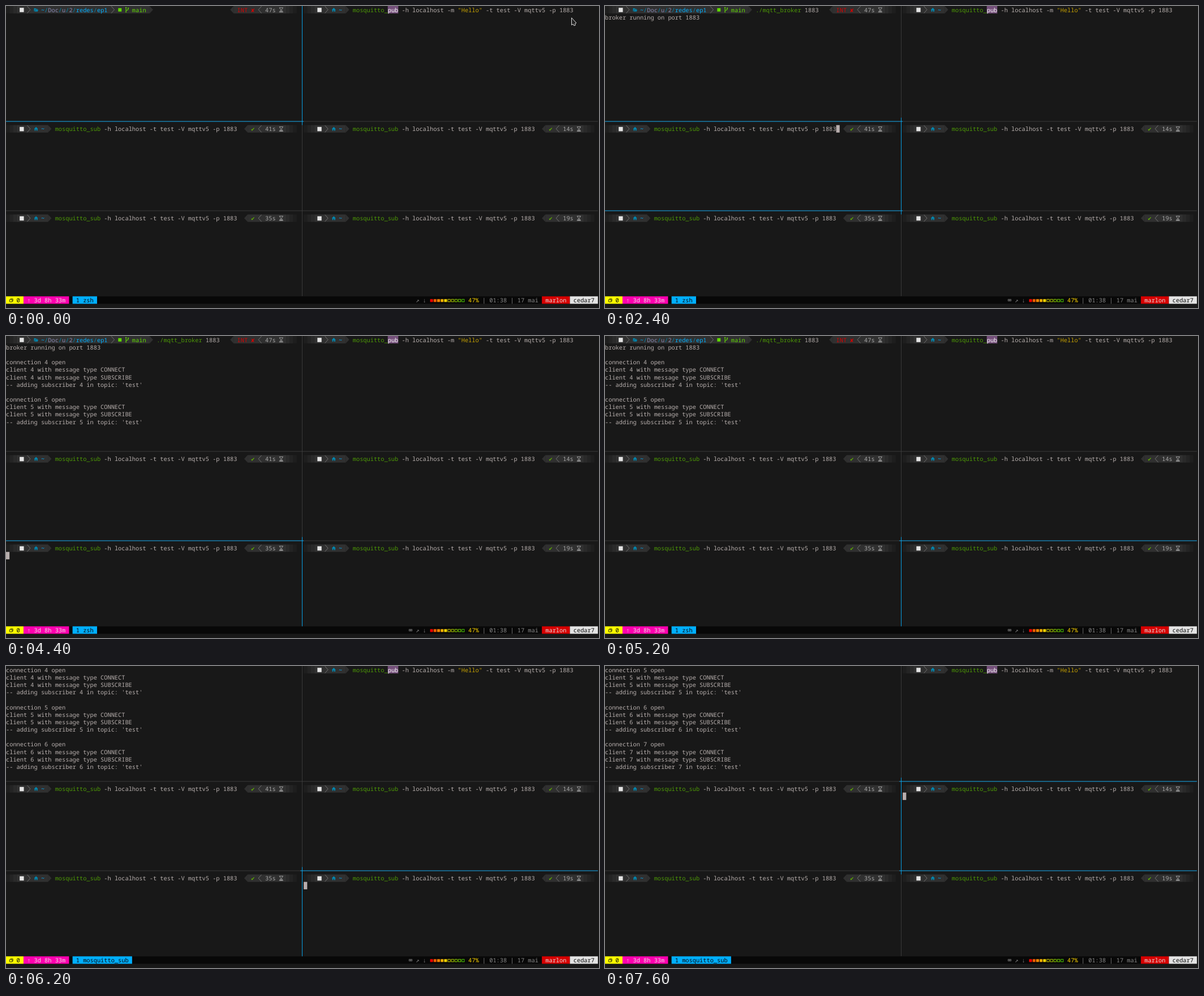
These frames come from a looping animation (1048 by 534 pixels, 8 s). An HTML page:

```html
<!DOCTYPE html>
<html lang="en">
<head>
<meta charset="utf-8">
<title>Broker terminal session</title>
<style>
html, body { margin: 0; width: 100%; height: 100%; overflow: hidden; background: #181818; }
svg { display: block; width: 1048px; height: 534px; }
text {
  font: 10.32px "Noto Sans Mono", "DejaVu Sans Mono", monospace;
  white-space: pre;
  text-rendering: geometricPrecision;
}
</style>
</head>
<body>
<svg id="stage" viewBox="0 0 1048 534">
  <g id="fixed"></g>
  <g id="live"></g>
</svg>
<script>
const LOOP = 8000;
const W = 6.19, H = 13.163;      // terminal cell
const SPLIT = 84;                // column of the vertical divider
const COLS = 169, STATUS_ROW = 39, TOP_ROWS = 15;

const C = {
  text: '#b8b0ae', cursor: '#b8aeae', command: '#4e9a06', quoted: '#c4a000',
  pill: '#303030', thin: '#808080', dir: '#0087af', anchor: '#00afff', short: '#8787af',
  git: '#5fd700', ok: '#5faf00', error: '#d70000', took: '#a8a8a8', mark: '#e4e4e4',
  border: '#404040', active: '#00afff', bar: '#080808', muted: '#8a8a8a',
};

const n = v => +v.toFixed(2);
const escape = s => s.replace(/&/g, '&amp;').replace(/</g, '&lt;');

const rect = (x, y, w, h, fill, extra = '') =>
  `<rect x="${n(x)}" y="${n(y)}" width="${n(w)}" height="${n(h)}" fill="${fill}" ${extra}/>`;

const cells = (col, row, count, fill, extra) =>
  rect(col * W, row * H, count * W, H, fill, extra);

const text = (col, row, str, fill = C.text, bold = false) =>
  `<text x="${n(col * W)}" y="${n(row * H + 10.75)}" fill="${fill}"${bold ? ' font-weight="700"' : ''}>${escape(str)}</text>`;

// A path in coordinates local to one cell
const glyph = (col, row, d, fill, stroke = 'none', width = .8) =>
  `<path transform="translate(${n(col * W)} ${n(row * H)})" d="${d}" fill="${fill}" stroke="${stroke}" stroke-width="${width}"/>`;

// Consecutive [text, colour, bold] pieces
function run(col, row, pieces) {
  let out = '';
  for (const [str, fill, bold] of pieces) {
    out += text(col, row, str, fill, bold);
    col += str.length;
  }
  return out;
}

const ICON = {
  home: 'M0 6.8L3.6 3.2L7.2 6.8H6.2V10H4.3V7.6H2.9V10H1V6.8Z',
  folder: 'M0 9.6V4H2.6L3.4 5H6V6H2L.8 9.6ZM1.2 9.8L2.4 6.6H7.6L6.4 9.8Z',
  branch: 'M1.6 3V10.6M5.6 4V5.4Q5.6 7 1.6 8M.5 2.6H2.7M.5 10.8H2.7M4.5 3.6H6.7',
  hourglass: 'M0 3H7M0 10.8H7M1 3V4.4L3.2 6.9L1 9.4V10.8M6 3V4.4L3.8 6.9L6 9.4V10.8M2 10L3.5 8.6L5 10Z',
  keyboard: 'M.4 5.3H5.9V8.3H.4ZM1.3 6.4H5M1.8 7.4H4.5',
  stack: 'M1.8 5V4.5H6V8.7H5M.4 5.6H4.6V9.8H.4Z',
};

const thinRight = (col, row) => glyph(col, row, `M.3 .4L5.8 ${H / 2}L.3 ${H - .4}`, 'none', C.thin);
const thinLeft = (col, row) => glyph(col, row, `M5.9 .4L.4 ${H / 2}L5.9 ${H - .4}`, 'none', C.thin);

const fade = (col, row, order) =>
  order.map((a, i) => cells(col + i, row, 1, C.pill, `opacity="${a}"`)).join('');

function promptLeft(col, row, width) {
  return fade(col, row, [.25, .5, .75]) +
    cells(col + 3, row, width - 3, C.pill) +
    glyph(col + width, row, `M0 0L${W} ${H / 2}L0 ${H}Z`, C.pill) +
    rect((col + 4) * W - .6, row * H + 3.2, 7.4, 7.6, C.mark) +
    thinRight(col + 6, row);
}

const homePrompt = (col, row) =>
  promptLeft(col, row, 12) +
  glyph(col + 8, row, ICON.home, C.dir) +
  text(col + 10, row, '~', C.anchor, true);

function promptRight(col, row, start, status, took) {
  return glyph(col + start, row, `M${W} 0L0 ${H / 2}L${W} ${H}Z`, C.pill) +
    cells(col + start + 1, row, 79 - start, C.pill) +
    fade(col + 80, row, [.75, .5, .25]) +
    status + thinLeft(col + 72, row) +
    text(col + 74, row, took, C.took) +
    glyph(col + 78, row, ICON.hourglass, 'none', C.took, .9);
}

const subscriber = (col, row, took) =>
  homePrompt(col, row) +
  run(col + 14, row, [['mosquitto_sub', C.command], [' -h localhost -t test -V mqttv5 -p 1883', C.text]]) +
  promptRight(col, row, 68, text(col + 70, row, '✔', C.ok), took);

function publisher() {
  const col = SPLIT + 1;
  return homePrompt(col, 0) + cells(col + 24, 0, 3, '#75507b') +
    run(col + 14, 0, [
      ['mosquitto_', C.command], ['pub', '#ffffff', true], [' -h localhost -m ', C.text],
      ['"Hello"', C.quoted], [' -t test -V mqttv5 -p 1883', C.text],
    ]);
}

function brokerPrompt(row) {
  return promptLeft(0, row, 41) +
    glyph(8, row, ICON.folder, C.dir) +
    run(10, row, [
      ['~', C.anchor, true], ['/', C.dir], ['Doc', C.short], ['/', C.dir], ['u', C.short], ['/', C.dir],
      ['2', C.short], ['/', C.dir], ['redes', C.anchor, true], ['/', C.dir], ['ep1', C.anchor, true],
    ]) +
    thinRight(30, row) +
    rect(32 * W + .2, row * H + 3.8, 6, 6, C.git) +
    glyph(34, row, ICON.branch, 'none', C.git, 1.1) +
    text(36, row, 'main', C.git) +
    promptRight(0, row, 64, text(66, row, 'INT', C.error) + text(70, row, '✘', C.error), '47s');
}

const hLine = (row, from, to, fill) => rect(from * W, row * H + 6.19, (to - from) * W, .85, fill);
const vLine = (from, to, fill) => rect(SPLIT * W + 3.1, from * H, .85, (to - from) * H, fill);

// Pane edges: rows of the dividers above and below (null at the screen edge)
const PANES = [
  { right: false, above: null, below: 15 },
  { right: false, above: 15, below: 27 },
  { right: false, above: 27, below: null },
  { right: true, above: 27, below: null },
  { right: true, above: 15, below: 27 },
];

function activeBorder({ right, above, below }) {
  const from = right ? SPLIT : 0, to = right ? COLS : SPLIT + 1;
  return [above, below].filter(r => r !== null).map(r => hLine(r, from, to, C.active)).join('') +
    vLine(above ?? 0, below === null ? STATUS_ROW : below + 1, C.active);
}

function battery() {
  const heat = ['#ff0000', '#ff5f00', '#ff8700', '#ffaf00', '#ffd700',
    '#ffff00', '#d7ff00', '#afff00', '#87ff00', '#5fff00'];
  const y = STATUS_ROW * H + 5;
  return heat.map((c, i) => {
    const x = (121 + i) * W + .6;
    return i < 5 ? rect(x, y, 5, 5, c)
      : rect(x + .4, y + .4, 4.2, 4.2, 'none', `stroke="${c}" stroke-width=".8"`);
  }).join('');
}

function statusBar() {
  const r = STATUS_ROW;
  return cells(0, r, COLS, C.bar) +
    cells(0, r, 5, '#ffff00') + glyph(1, r, ICON.stack, 'none', C.bar) + text(3, r, '0', C.bar, true) +
    cells(5, r, 13, '#ff00af') + text(6, r, '↑', C.mark) + text(8, r, '3d 8h 33m', C.mark) +
    text(117, r, '↗', C.muted) + text(119, r, '↓', C.muted) +
    battery() + text(132, r, '47%', '#ffd700') +
    text(136, r, '| 01:38 | 17 mai', C.muted) +
    cells(153, r, 8, '#d70000') + text(154, r, 'marlon', C.mark) +
    cells(161, r, 8, C.mark) + text(162, r, 'cedar7', C.bar, true);
}

const clientLog = id => [
  '', `connection ${id} open`,
  `client ${id} with message type CONNECT`,
  `client ${id} with message type SUBSCRIBE`,
  `-- adding subscriber ${id} in topic: 'test'`,
];

function brokerPane({ typed, started, clients }) {
  const lines = ['', started ? 'broker running on port 1883' : ''];
  for (let i = 0; i < clients; i++) lines.push(...clientLog(4 + i));
  const scroll = Math.max(0, lines.length + 1 - TOP_ROWS);
  let out = lines.slice(scroll).map((s, i) => s && text(0, i, s)).join('');
  if (!scroll) {
    out += brokerPrompt(0);
    if (typed) out += run(43, 0, [['./mqtt_broker', C.command], [' 1883', C.text]]);
  }
  return out;
}

const windowTab = name =>
  cells(19, STATUS_ROW, name.length + 4, C.active) +
  text(20, STATUS_ROW, '1 ' + name, C.bar, true);

const pointer = '<path d="M999.5 20.8V33.6L1002.4 32L1003.8 34.8L1006.4 33.8L1005.4 31.2L1008 30Z" fill="#222" stroke="#ddd" stroke-width="1"/>';

// Each step lists only what changes
const SUB = 'mosquitto_sub';
const STEPS = [
  [0, { pane: 0, cursor: null, name: 'zsh', prefix: false, typed: false, started: false, clients: 0, mouse: true }],
  [100, { mouse: false, cursor: [43, 0] }],
  [400, { typed: true, cursor: [61, 0] }],
  [800, { cursor: null }],
  [1200, { started: true, cursor: [0, 2] }],
  [1800, { name: './mqtt_broker', prefix: true }],
  [2100, { pane: 1, cursor: [66, 16] }],
  [2400, { name: 'zsh' }],
  [3500, { pane: 2, clients: 1, cursor: [66, 28] }],
  [3900, { prefix: false, cursor: [0, 29] }],
  [4000, { clients: 2 }],
  [4400, { prefix: true }],
  [4800, { pane: 3, cursor: [151, 28], name: SUB }],
  [5200, { cursor: null, name: 'zsh' }],
  [5400, { clients: 3, cursor: [85, 29], prefix: false }],
  [6200, { name: SUB, prefix: true }],
  [6500, { pane: 4, cursor: [151, 16], name: 'zsh' }],
  [7100, { clients: 4, cursor: [85, 17], prefix: false }],
  [7600, { name: SUB, prefix: true }],
];

const fixed = document.getElementById('fixed');
const live = document.getElementById('live');

fixed.innerHTML =
  hLine(15, 0, COLS, C.border) + hLine(27, 0, COLS, C.border) + vLine(0, STATUS_ROW, C.border) +
  publisher() +
  subscriber(0, 16, '41s') + subscriber(SPLIT + 1, 16, '14s') +
  subscriber(0, 28, '35s') + subscriber(SPLIT + 1, 28, '19s') +
  statusBar();

let shown = -1;

function render(time) {
  const passed = STEPS.filter(([at]) => at <= time);
  if (passed.length === shown) return;
  shown = passed.length;
  const state = Object.assign({}, ...passed.map(([, change]) => change));
  live.innerHTML =
    activeBorder(PANES[state.pane]) +
    brokerPane(state) +
    windowTab(state.name) +
    (state.prefix ? glyph(115, STATUS_ROW, ICON.keyboard, 'none', C.muted, .7) : '') +
    (state.cursor ? cells(...state.cursor, 1, C.cursor) : '') +
    (state.mouse ? pointer : '');
}

const start = performance.now();
function tick() {
  render((performance.now() - start) % LOOP);
  requestAnimationFrame(tick);
}
tick();
</script>
</body>
</html>
```
